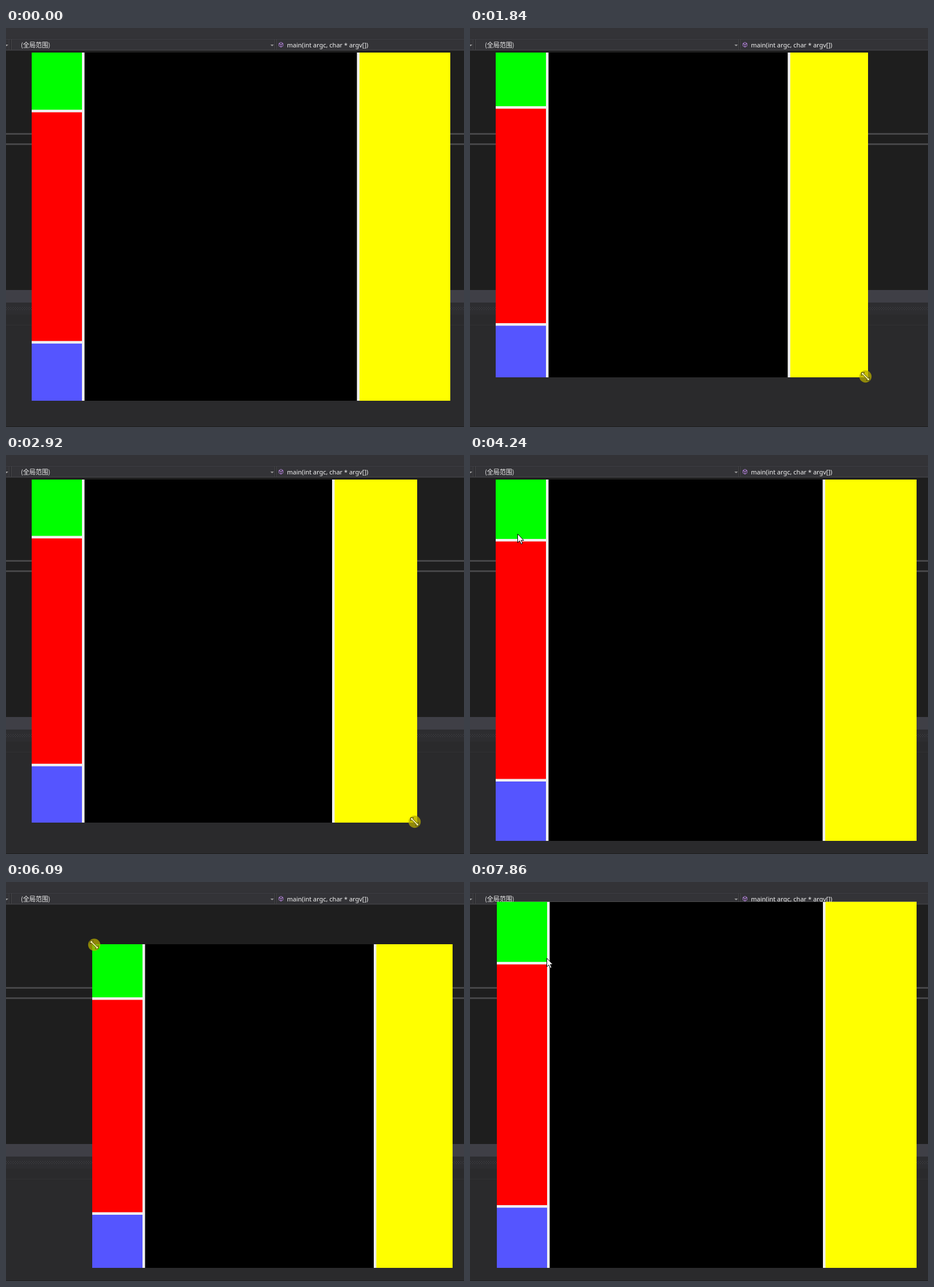
An HTML page with a canvas that plays this animation: 802 px wide and 699 px high, repeating every 8000 ms.

```html
<!DOCTYPE html>
<html lang="zh">
<head>
<meta charset="utf-8">
<title>Resizable window</title>
<style>
html, body { margin: 0; width: 100%; height: 100%; overflow: hidden; background: #1e1e1e; }
canvas { display: block; }
</style>
</head>
<body>
<canvas id="stage" width="802" height="699"></canvas>
<script>
const ctx = document.getElementById('stage').getContext('2d');
const LOOP = 8000, STEP = 77, OFFSET = 13;

// Tracks: [step, x, y], linear between rows.
const bottomRight = [
  [14, 778, 653], [17, 796, 673], [18, 792, 670], [21, 735, 637], [23, 700.5, 615.5],
  [24, 697, 612], [25, 696, 611], [31, 765, 670], [36, 716, 640], [38, 720, 644], [47, 782, 676]
];
const topLeft = [
  [67, 45, 43], [70, 38, 37], [72, 27, 27], [73, 30, 29], [78, 142, 103], [79, 151, 109],
  [82, 31, 31], [84, 31, 31], [87, 49, 37], [88, 49, 37], [93, 47, 34.5]
];
const pointer = [
  [4, 767, 661], [5, 772, 648], [6, 775, 640], [7, 775, 640], [10, 765, 640],
  [51, 700, 590], [55, 83, 138], [57, 58, 80], [59, 46, 45], [61, 60, 30], [63, 58, 86], [64, 52, 60],
  [95, 58, 48], [99, 143, 134], [100, 143, 134], [102, 134, 133]
];

function at(track, step) {
  const i = track.findIndex(row => row[0] > step);
  if (i === 0) return track[0].slice(1);
  if (i < 0) return track[track.length - 1].slice(1);
  const [s0, x0, y0] = track[i - 1], [s1, x1, y1] = track[i];
  const p = (step - s0) / (s1 - s0);
  return [x0 + (x1 - x0) * p, y0 + (y1 - y0) * p];
}

const within = (v, a, b) => v >= a && v <= b;

function rect(color, x, y, w, h) {
  ctx.fillStyle = color;
  ctx.fillRect(x, y, w, h);
}

function shape(points, fill, stroke) {
  ctx.beginPath();
  points.forEach(([x, y]) => ctx.lineTo(x, y));
  ctx.closePath();
  if (fill) { ctx.fillStyle = fill; ctx.fill(); }
  if (stroke) { ctx.strokeStyle = stroke; ctx.lineWidth = 1; ctx.stroke(); }
}

function text(str, x, y, font) {
  ctx.font = font;
  ctx.fillStyle = '#f1f1f1';
  ctx.fillText(str, x, y);
}

function dropMark(x, color) {
  shape([[x - 3, 29], [x + 3, 29], [x, 32]], color);
}

function drawEditor(hover) {
  rect('#1e1e1e', 0, 0, 802, 699);
  rect('#333337', 0, 0, 802, 18);
  rect('#2d2d30', 0, 18, 802, 22);
  rect('#3f3f46', 0, 19, 802, 1);
  rect('#333337', 0, 20, 802, 18);
  rect('#434346', 0, 38, 802, 1);
  [5, 9, 470, 473].forEach(x => rect('#434346', x, 20, 1, 18));
  [6, 471].forEach(x => rect('#2d2d30', x, 20, 2, 18));
  if (hover) rect('#1f1f20', 460, 20, 11, 18);
  dropMark(1, '#999');
  dropMark(466, hover ? '#007acc' : '#999');
  text('(全局范围)', 26, 34, '11px "Noto Sans CJK SC", "Noto Sans CJK", sans-serif');
  text('main(int argc, char * argv[])', 492, 34, '11px "Noto Sans", "Open Sans", sans-serif');

  const cube = [[481.5, 25], [485, 27], [485, 31.5], [481.5, 33.5], [478, 31.5], [478, 27]];
  shape(cube, null, '#b180d7');
  shape([[478, 27], [481.5, 29], [485, 27], [481.5, 29], [481.5, 33.5], [481.5, 29]], null, '#b180d7');

  rect('#464648', 0, 184, 802, 3);
  rect('#464648', 0, 202, 802, 3);
  rect('#3f3f46', 0, 459, 802, 22);
  rect('#2d2d30', 0, 481, 802, 21);
  rect('#2a2a2c', 0, 502, 802, 197);
  rect('#303033', 0, 520, 802, 1);
  rect('#1e1e1e', 0, 698, 802, 1);
  for (let row = 0; row < 3; row++)
    for (let x = row % 2 * 2; x < 802; x += 4) rect('#46464a', x, 489 + row * 2, 1, 1);
}

function drawWindow(step) {
  const [l, t] = at(topLeft, step), [r, b] = at(bottomRight, step);
  // Panels trail the frame by one step while it shrinks.
  const [pr, pb] = at(bottomRight, step - 1);
  const w = Math.max(r, pr) - l, h = Math.max(b, pb) - t;
  const gap = 4.5, side = 88;
  const unitX = (w - side - 2 * gap) / 4, unitY = (h - 2 * gap) / 6;
  const mid = l + side + gap, right = mid + 3 * unitX + gap;
  const redTop = t + unitY + gap, blueTop = redTop + 4 * unitY + gap;

  ctx.save();
  ctx.beginPath();
  ctx.rect(l, t, r - l, b - t);
  ctx.clip();
  rect('#f0f0f0', l, t, w, h);
  rect('#00ff00', l, t, side, unitY);
  rect('#ff0000', l, redTop, side, 4 * unitY);
  rect('#5555ff', l, blueTop, side, unitY);
  rect('#000', mid, t, 3 * unitX, h);
  rect('#ffff00', right, t, unitX, h);
  ctx.restore();
}

function drawArrow([x, y]) {
  const outline = [[0, 0], [0, 15], [3.5, 11.7], [6, 17.5], [8.5, 16.5], [6, 11], [10.5, 11]];
  shape(outline.map(([dx, dy]) => [x + dx + .5, y + dy + .5]), '#fff', '#000');
}

function drawResize(x, y, pressed) {
  if (pressed) {
    ctx.fillStyle = 'rgba(180,170,0,.75)';
    ctx.beginPath();
    ctx.arc(x, y, 10.7, 0, Math.PI * 2);
    ctx.fill();
  }
  const half = [[-7, -7], [-1.5, -7], [-3.3, -5.2], [5.2, 3.3], [7, 1.5], [7, 7],
                [1.5, 7], [3.3, 5.2], [-5.2, -3.3], [-7, -1.5]];
  shape(half.map(([dx, dy]) => [x + dx, y + dy]), pressed ? '#f6f2a0' : '#fff', pressed ? '#4a4600' : '#000');
}

function render(time) {
  const step = Math.floor((time % LOOP + OFFSET) / STEP);
  const atBottom = within(step, 11, 50), atTop = within(step, 65, 94);
  const arrow = step >= 4 && !atBottom && !atTop ? at(pointer, step) : null;
  drawEditor(arrow && arrow[1] < 40);
  drawWindow(step);
  if (arrow) drawArrow(arrow);
  if (atBottom) {
    const [x, y] = at(bottomRight, step);
    drawResize(x - 4.5, y - 1.5, within(step, 15, 48));
  }
  if (atTop) {
    const [x, y] = at(topLeft, step);
    drawResize(x + 3.5, y + 1, step >= 68);
  }
}

const start = performance.now();
function tick() {
  render(performance.now() - start);
  requestAnimationFrame(tick);
}
tick();
</script>
</body>
</html>
```
